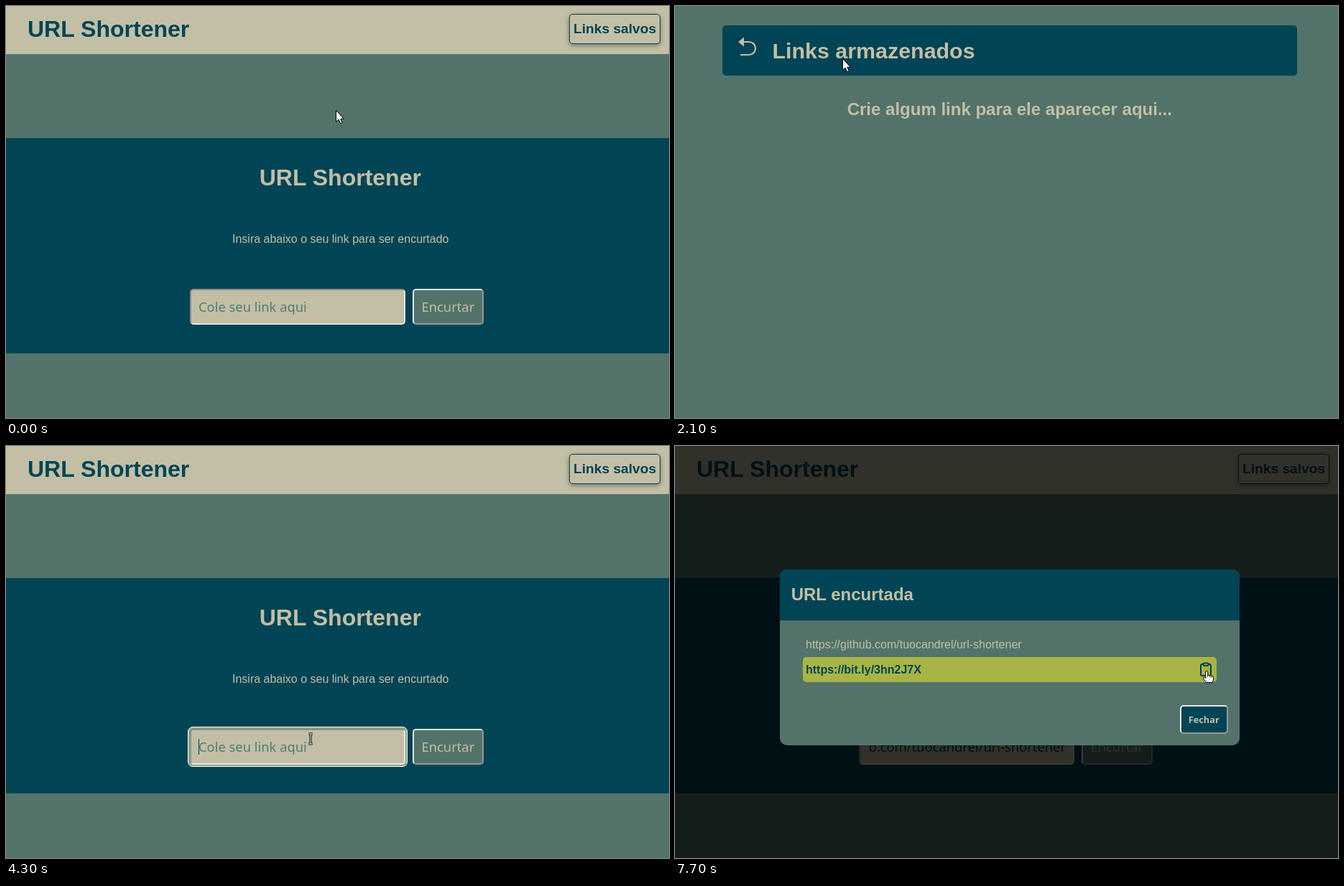
These frames come from a looping animation (923 by 574 pixels, 8000 ms). An HTML page:

```html
<!DOCTYPE html>
<html lang="pt">
<head>
<meta charset="utf-8">
<title>URL Shortener</title>
<style>
  :root { --sand: #c2bfa5; --navy: #004455; --sage: #53736a; --lime: #a8b445; }
  html, body { margin: 0; width: 100%; height: 100%; overflow: hidden; background: var(--sage); }
  div, body > svg, div > svg { position: absolute; box-sizing: border-box; }
  .screen, body > svg, div > svg { left: 0; top: 0; width: 923px; height: 574px; }
  .sand { background: var(--sand); }
  .navy { background: var(--navy); }
  .sage { background: var(--sage); }
  .lime { background: var(--lime); }
  .round { border-radius: 5px; }
  .inset { border: 2px solid; border-color: #918d8c #e6e4e8 #e6e4e8 #918d8c; }
  .outset { border: 2px solid; border-color: #e6e4e8 #9a9593 #9a9593 #e6e4e8; }
  text { font: 16px "Liberation Sans", Arial, sans-serif; fill: var(--sand); white-space: pre; }
  .bold { font-weight: bold; }
  .dark { fill: var(--navy); }
  .ui { font: 18.35px "Noto Sans", sans-serif; }
  .status { font: 12.87px "Noto Sans", sans-serif; fill: #2e3234; }
  .line { fill: none; stroke-width: 2.2; }
  .pointer path { stroke: #000; fill: #fff; stroke-linejoin: round; }
</style>
</head>
<body>

<div class="screen sage" id="home">
  <div class="sand" style="left:0;top:0;width:923px;height:67px"></div>
  <div class="sand round" style="left:784px;top:11px;width:127px;height:42px;border:1px solid var(--navy);box-shadow:0 2px 6px #0006"></div>
  <div class="navy" style="left:0;top:184px;width:923px;height:300px"></div>
  <div id="ring" style="left:253px;top:391px;width:306px;height:56px;border:1px solid #fff;border-radius:7px;background:#8aa679"></div>
  <div class="sand round inset" style="left:256px;top:394px;width:300px;height:50px"></div>
  <div class="sage round outset" style="left:566px;top:394px;width:99px;height:50px"></div>
  <svg>
    <text class="bold dark" x="30" y="43" style="font-size:32px">URL Shortener</text>
    <text class="bold dark" x="790" y="38" style="font-size:19.2px">Links salvos</text>
    <text class="bold" x="352.7" y="250" style="font-size:32px">URL Shortener</text>
    <text x="315" y="330">Insira abaixo o seu link para ser encurtado</text>
    <text class="ui" id="hint" x="268" y="426" style="fill:#4f7d78">Cole seu link aqui</text>
    <svg x="268.5" y="400" width="277" height="38">
      <text class="ui dark" id="typed" x="275.5" y="26" text-anchor="end">https://github.com/tuocandrel/url-shortener</text>
    </svg>
    <rect class="dark" id="caret" y="408" width="1" height="22"/>
    <text class="ui" x="578.5" y="426">Encurtar</text>
  </svg>
</div>

<div class="screen sage" id="links">
  <div class="navy round" style="left:66px;top:27px;width:800px;height:70px"></div>
  <svg>
    <path d="M88 50l8-6.5v13z" fill="#c2bfa5"/>
    <path class="line" d="M95 50h8a9 9 0 0 1 0 18H91" stroke="#c2bfa5"/>
    <text class="bold" x="135.5" y="73" style="font-size:30.4px">Links armazenados</text>
    <text class="bold" x="239.7" y="152" style="font-size:24px">Crie algum link para ele aparecer aqui...</text>
  </svg>
</div>

<div class="screen" id="modal" style="background:#000000bf">
  <div class="sage" style="left:146px;top:172px;width:640px;height:245px;border-radius:10px"></div>
  <div class="navy" style="left:146px;top:172px;width:640px;height:71px;border-radius:10px 10px 0 0"></div>
  <div class="lime round" style="left:178px;top:294px;width:576px;height:35px"></div>
  <div class="navy round outset" style="left:703px;top:361px;width:67px;height:40px"></div>
  <svg>
    <text class="bold" x="161.7" y="215" style="font-size:24px">URL encurtada</text>
    <text x="182" y="282">https://github.com/tuocandrel/url-shortener</text>
    <text class="bold dark" x="182" y="317">https://bit.ly/3hn2J7X</text>
    <g class="line" stroke="#004455" style="stroke-width:2">
      <rect x="732" y="304" width="14" height="16" rx="2"/>
      <rect x="735.5" y="302.5" width="7" height="3.5" rx="1" fill="#a8b445"/>
    </g>
    <text class="ui" x="714.7" y="386" style="font-size:12.8px;font-weight:bold">Fechar</text>
  </svg>
</div>

<svg>
  <g id="status">
    <rect id="bar" x="-3.5" y="560.5" height="20" rx="3" fill="#f2f2f2" stroke="#b4b8b6"/>
    <text class="status" id="address" x="4" y="576"></text>
  </g>
  <g class="pointer" id="arrow">
    <path d="M.5 .5V16.2L4 13L6.7 18.8L9.2 17.7L6.7 12.2H11.3Z"/>
  </g>
  <g class="pointer" id="hand">
    <path d="M-1.3 9.5V1a1.5 1.5 0 0 1 3 0V5.5Q3.2 4.2 4.5 6Q6 5 7 6.8Q9.5 6 9.5 8.5V12L8 15.5H-.5L-4.3 10.2Q-4.5 7.8-2.6 8.5Z"/>
    <path d="M1.7 5.5V8.5M4.5 6V8.7M7 6.8V9" style="stroke-width:.8"/>
  </g>
  <g class="pointer" id="beam">
    <path d="M-3-7H3M0-7V7M-3 7H3" style="stroke-width:3"/>
    <path d="M-3-7H3M0-7V7M-3 7H3" style="stroke:#fff"/>
  </g>
</svg>

<script>
const $ = id => document.getElementById(id);
const LOOP = 8000, STEP = 100;
const SITE = "https://tuocandrel.github.io/url-shortener/#/";

// pointer path: time, x, y
const path = [
  [0, 459, 145], [100, 461, 150], [200, 472, 157], [300, 506, 158], [500, 636, 126],
  [700, 762, 68], [900, 824, 38], [1400, 824, 38], [1600, 690, 52], [1900, 380, 82],
  [2200, 160, 68], [2400, 134, 68], [2500, 134, 68], [2600, 108, 62], [2700, 108, 62],
  [2800, 107, 61], [3000, 107, 61], [3200, 210, 160], [3400, 390, 340], [3600, 466, 414],
  [3900, 431, 408], [4000, 431, 408], [4100, 424, 408], [4400, 424, 408], [4500, 424, 406],
  [4600, 424, 406], [4700, 431, 406], [4900, 431, 406], [5200, 535, 414], [5400, 601, 420],
  [6000, 601, 420], [6100, 590, 415], [6300, 600, 396], [6600, 694, 334], [6800, 726, 311],
  [7000, 745, 314], [7100, 745, 314], [7200, 741, 314], [7600, 741, 314], [7700, 740, 314],
  [LOOP, 740, 314]
];

const within = (t, a, b) => t >= a && t < b;
const show = (id, on) => $(id).style.visibility = on ? "visible" : "hidden";

function pointerAt(t) {
  const i = path.findIndex(p => p[0] > t);
  const [t0, x0, y0] = path[i - 1], [t1, x1, y1] = path[i];
  const k = (t - t0) / (t1 - t0);
  return [Math.round(x0 + (x1 - x0) * k), Math.round(y0 + (y1 - y0) * k)];
}

function draw(now) {
  const t = Math.floor(now % LOOP / STEP) * STEP;
  const [x, y] = pointerAt(t);
  const onLinks = within(t, 1400, 3000);
  const pasted = t >= 4500, modal = t >= 6100;
  const focused = within(t, 4100, 5700);

  show("links", onLinks);
  show("modal", modal);
  show("ring", focused);
  show("hint", !pasted);
  show("typed", pasted);
  show("caret", focused && !within(t, 5000, 5400));
  $("caret").setAttribute("x", pasted ? 544 : 268);

  const toLinks = t < 2000;
  show("status", within(t, 1000, 1500) || within(t, 2800, 3100));
  $("status").style.opacity = t === 1000 || t === 1400 ? .72 : 1;
  $("bar").setAttribute("width", toLinks ? 314 : 283);
  $("address").textContent = SITE + (toLinks ? "Links" : "");

  const overInput = !onLinks && !modal && x > 256 && x < 556 && y > 394 && y < 444;
  const overLink = within(t, 1000, 1400) || within(t, 2600, 3100) || t >= 6900;
  const shape = overInput ? "beam" : overLink ? "hand" : "arrow";
  for (const id of ["arrow", "hand", "beam"]) show(id, id === shape);
  $(shape).setAttribute("transform", `translate(${x} ${y})`);
}

const start = performance.now();
function tick() {
  draw(performance.now() - start);
  requestAnimationFrame(tick);
}
tick();
</script>
</body>
</html>
```
